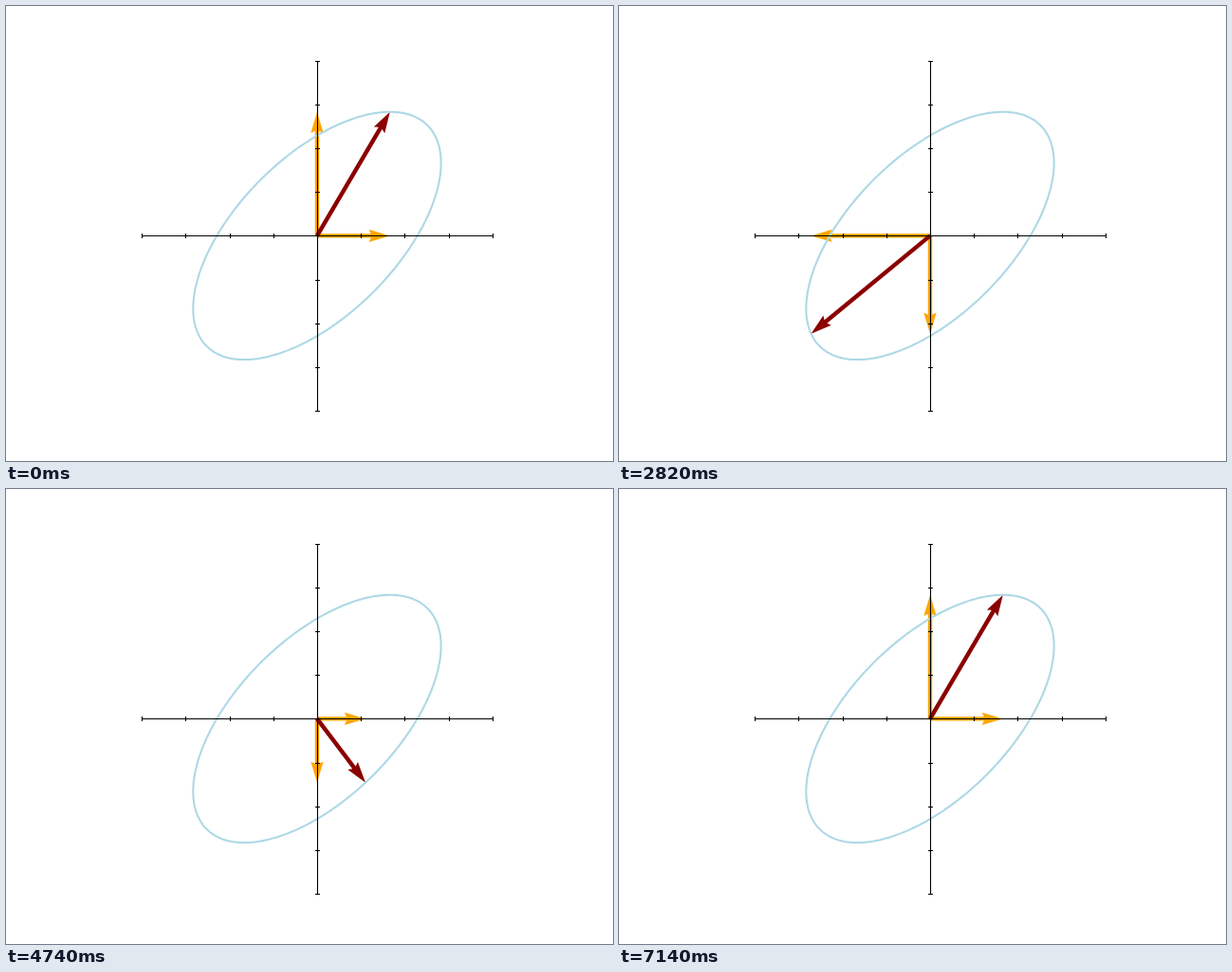
An HTML page with a canvas for the animation above (7200 ms loop, 640 px wide and 480 px high).

```html
<!DOCTYPE html>
<html lang="en">
<head>
<meta charset="utf-8">
<title>Rotating vector on an ellipse</title>
<style>
html, body { margin: 0; width: 100%; height: 100%; overflow: hidden; background: #fff; }
canvas { display: block; }
</style>
</head>
<body>
<canvas id="stage" width="640" height="480"></canvas>
<script>
const ctx = document.getElementById('stage').getContext('2d');
const TAU = Math.PI * 2;
const CX = 328, CY = 242.4, UNIT = 46.2;
const AMP = UNIT * Math.SQRT2 * 2;
const PHASE = 0.3 * Math.PI;
const STEP = 60, STEPS = 120;
const WIDTH = 4.435; // shaft width; arrow sizes below are multiples of it
const HEAD = 5, NOTCH = 4.5, HALF_HEAD = 1.5;

const snap = v => Math.round(v) + 0.5;
const point = a => [AMP * Math.cos(a + PHASE), -AMP * Math.cos(a)];

function arrow(dx, dy, color) {
  const len = Math.hypot(dx, dy) / WIDTH;
  const full = Math.max(len, HEAD);
  ctx.save();
  ctx.translate(CX, CY);
  ctx.rotate(Math.atan2(dy, dx));
  ctx.scale(WIDTH, WIDTH);
  ctx.beginPath();
  if (len < 1) {
    // Very short vectors become a small hexagon
    for (let k = 0; k < 6; k++) {
      ctx.lineTo(Math.cos(k * TAU / 6) / 2, Math.sin(k * TAU / 6) / 2);
    }
  } else {
    // Vectors shorter than the head shrink as a whole
    ctx.scale(len / full, len / full);
    ctx.moveTo(0, -0.5);
    ctx.lineTo(full - NOTCH, -0.5);
    ctx.lineTo(full - HEAD, -HALF_HEAD);
    ctx.lineTo(full, 0);
    ctx.lineTo(full - HEAD, HALF_HEAD);
    ctx.lineTo(full - NOTCH, 0.5);
    ctx.lineTo(0, 0.5);
  }
  ctx.closePath();
  ctx.fillStyle = color;
  ctx.fill();
  ctx.restore();
}

function line(x1, y1, x2, y2, cap) {
  ctx.lineCap = cap;
  ctx.beginPath();
  ctx.moveTo(x1, y1);
  ctx.lineTo(x2, y2);
  ctx.stroke();
}

function ellipse() {
  ctx.beginPath();
  for (let k = 0; k < 240; k++) ctx.lineTo(...point(k * TAU / 240).map((v, i) => v + [CX, CY][i]));
  ctx.closePath();
  ctx.strokeStyle = '#add8e6';
  ctx.lineWidth = 2.08;
  ctx.stroke();
}

function axes() {
  const x0 = snap(CX), y0 = snap(CY), tick = 2.43;
  ctx.strokeStyle = '#000';
  ctx.lineWidth = 1.11;
  for (let k = -4; k <= 4; k++) {
    const x = snap(CX + k * UNIT), y = snap(CY + k * UNIT);
    line(x, y0 - tick, x, y0 + tick, 'butt');
    line(x0 - tick, y, x0 + tick, y, 'butt');
  }
  const reach = 4 * UNIT;
  line(snap(CX - reach), y0, snap(CX + reach), y0, 'square');
  line(x0, snap(CY - reach), x0, snap(CY + reach), 'square');
}

function draw(time) {
  const step = Math.floor(time / STEP) % STEPS;
  const [dx, dy] = point(step / (STEPS - 1) * TAU);
  ctx.fillStyle = '#fff';
  ctx.fillRect(0, 0, 640, 480);
  arrow(dx, 0, '#ffa500');
  arrow(0, dy, '#ffa500');
  arrow(dx, dy, '#8b0000');
  ellipse();
  axes();
}

const start = performance.now();
function tick() {
  draw(performance.now() - start);
  requestAnimationFrame(tick);
}
tick();
</script>
</body>
</html>
```
